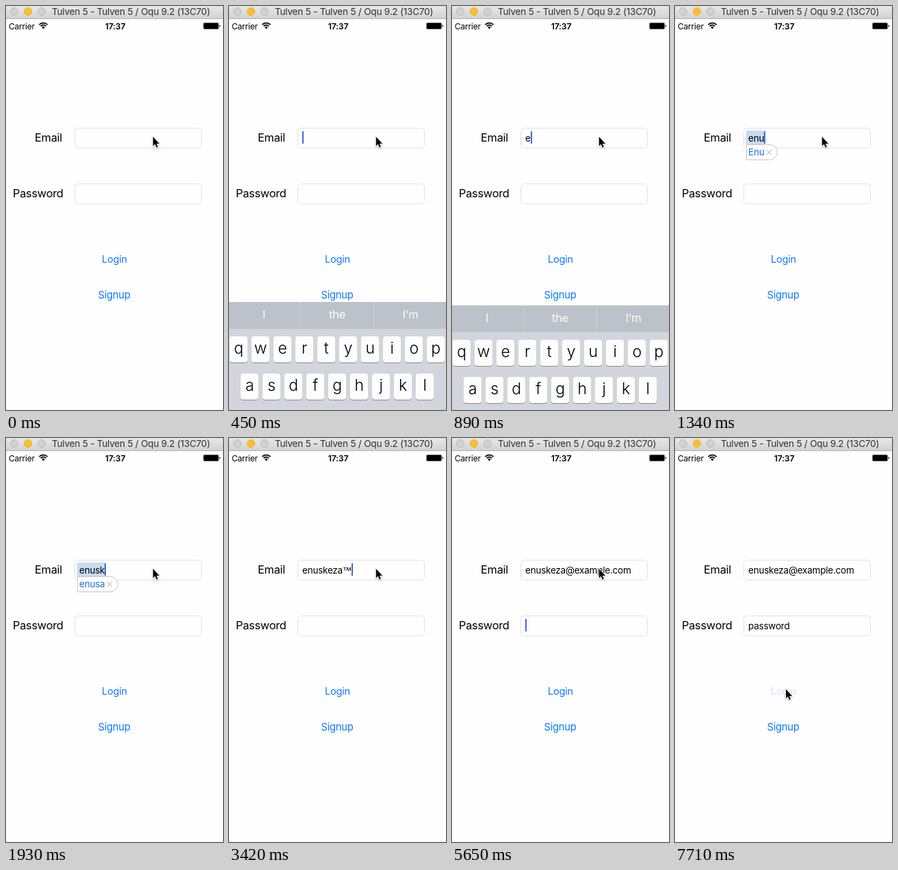
These frames come from a looping animation (317x587 px, 8000 ms). An HTML page with a canvas:

```html
<!DOCTYPE html>
<html lang="en">
<head>
<meta charset="utf-8">
<title>Login form</title>
<style>
  html, body { margin: 0; width: 100%; height: 100%; overflow: hidden; background: #fefefe; }
  canvas { display: block; width: 317px; height: 587px; }
</style>
</head>
<body>
<canvas id="stage"></canvas>
<script>
const W = 317, H = 587, LOOP = 8000;
const canvas = document.getElementById('stage');
const ctx = canvas.getContext('2d');
const dpr = window.devicePixelRatio || 1;
canvas.width = W * dpr;
canvas.height = H * dpr;

const BLUE = '#0a7aff', CARET = '#4169dc';
const USER = 'enuskeza', MAIL = USER + '@example.com', PASS = 'password';

// Each track is a list of [start time, value] with hard changes.
const keyboardTrack = [[0, 0], [300, 0.06], [450, 0.62], [590, 0.96], [740, 1], [890, 0.6], [1040, 0.1], [1190, 0]];
const emailTrack = [
  [0, ''], [890, USER.slice(0, 1)], [1190, USER.slice(0, 2)], [1340, USER.slice(0, 3)],
  [1630, USER.slice(0, 4)], [1930, USER.slice(0, 5)], [2080, USER.slice(0, 6)], [2380, USER],
  [3420, USER + '™'], [3570, USER], [3710, MAIL.slice(0, 9)], [3860, MAIL.slice(0, 10)],
  [4010, MAIL.slice(0, 11)], [4160, MAIL.slice(0, 12)], [4310, MAIL.slice(0, 14)],
  [4460, MAIL.slice(0, 15)], [4610, MAIL.slice(0, 16)], [4760, MAIL.slice(0, 17)],
  [4900, MAIL.slice(0, 18)], [5050, MAIL.slice(0, 19)], [5200, MAIL]
];
const hintTrack = [[0, ''], [1340, 'Enu'], [1630, 'enusa'], [2380, 'Nuskeza'], [2680, '']];
const passTrack = [[0, 0], [6090, 1], [6240, 3], [6390, 4], [6530, 6], [6680, 7], [6980, 8]];
const focusTrack = [[0, ''], [300, 'email'], [5650, 'pass'], [7420, '']];
const pointerTrack = [[0, 0], [7120, 0.2], [7270, 0.62], [7420, 0.93], [7560, 1]];

function at(track, t) {
  let value = track[0][1];
  for (const [start, v] of track) if (t >= start) value = v;
  return value;
}

function setFont(size, weight = 400, family = 'Inter') {
  ctx.font = `${weight} ${size}px ${family}, "Open Sans", sans-serif`;
  ctx.letterSpacing = size * -0.017 + 'px';
}

// Draws a string and returns the x where it ends (for left-aligned text).
function text(str, x, y, size, color = '#000', align = 'left', weight = 400, family = 'Inter') {
  setFont(size, weight, family);
  ctx.textAlign = align;
  ctx.fillStyle = color;
  ctx.fillText(str, x, y);
  return x + ctx.measureText(str).width;
}

function box(x, y, w, h, r, fill, stroke) {
  ctx.beginPath();
  ctx.roundRect(x, y, w, h, r);
  if (fill) { ctx.fillStyle = fill; ctx.fill(); }
  if (stroke) { ctx.strokeStyle = stroke; ctx.lineWidth = 1; ctx.stroke(); }
}

function line(points, color, width, closed) {
  ctx.beginPath();
  points.forEach(([x, y]) => ctx.lineTo(x, y));
  if (closed) ctx.closePath();
  ctx.strokeStyle = color;
  ctx.lineWidth = width;
  ctx.stroke();
}

function disc(x, y, r, fill, stroke) {
  ctx.beginPath();
  ctx.arc(x, y, r, 0, Math.PI * 2);
  if (fill) { ctx.fillStyle = fill; ctx.fill(); }
  ctx.strokeStyle = stroke;
  ctx.lineWidth = 1;
  ctx.stroke();
}

function titleBar() {
  const g = ctx.createLinearGradient(0, 0, 0, 18);
  g.addColorStop(0, '#e8e8e8');
  g.addColorStop(1, '#d2d2d2');
  ctx.fillStyle = g;
  ctx.fillRect(0, 0, W, 18);
  ctx.fillStyle = '#b4b4b4';
  ctx.fillRect(0, 18, W, 1);
  disc(12, 8, 5.5, '#d1d1d1', '#bcbcbc');
  disc(32, 8, 5.5, '#fdbe30', '#e9b02f');
  disc(52, 8, 5.5, '#d1d1d1', '#bcbcbc');
  text('Tulven 5 - Tulven 5 / Oqu 9.2 (13C70)', 67, 13, 13.6, '#303030');
}

function statusBar() {
  text('Carrier', 4, 33.5, 12);
  text('17:37', 159.5, 33.5, 12.3, '#000', 'center', 600);
  ctx.strokeStyle = '#000';
  ctx.lineWidth = 1.7;
  for (const r of [8.4, 5.3]) {
    ctx.beginPath();
    ctx.arc(54.5, 33, r, -Math.PI * 0.76, -Math.PI * 0.24);
    ctx.stroke();
  }
  ctx.beginPath();
  ctx.moveTo(54.5, 33.5);
  ctx.arc(54.5, 33, 3, -Math.PI * 0.76, -Math.PI * 0.24);
  ctx.fillStyle = '#000';
  ctx.fill();
  box(288.5, 24.5, 22, 9, 1.5, null, '#777');
  box(289, 25, 21, 8, 0.8, '#000');
  box(311.5, 27.5, 1.5, 3, 0.7, '#333');
}

function bubble(str) {
  setFont(13.5);
  const end = 107 + ctx.measureText(str).width;
  box(104.5, 201.5, end + 14.5 - 100, 22, [0, 11, 11, 0], '#fff', '#c6c6c6');
  text(str, 107, 217, 13.5, '#1b70d8');
  const x = end + 7, y = 212.5, s = 3.5;
  line([[x - s, y - s], [x + s, y + s]], '#a6a6a6', 1);
  line([[x + s, y - s], [x - s, y + s]], '#a6a6a6', 1);
}

function field(top, value, focused, marked) {
  box(100.5, top + 0.5, 185, 29, 5, '#fefefe', '#e1e1e1');
  if (marked) {
    setFont(13.5);
    ctx.fillStyle = '#c6dbf0';
    ctx.fillRect(104, top + 4, 3 + ctx.measureText(value).width, 20);
  }
  // The trade mark sign is full width, unlike Inter's.
  let end = 107;
  for (const part of value.split(/(?=™)/)) {
    end = text(part, end, top + 20, 13.5, '#000', 'left', 400, part === '™' ? '"Liberation Sans"' : 'Inter');
  }
  if (focused) {
    ctx.fillStyle = CARET;
    ctx.fillRect(Math.round(end), top + 5, 2, 18);
  }
}

function key(x, y, w, label, size, dark) {
  box(x, y + 1, w, 38, 4, '#888b91');
  box(x, y, w, 38, 4, dark ? '#abb1bd' : '#fdfdfd');
  if (label) text(label, x + w / 2, y + (size > 20 ? 25 : 24.5), size, '#000', 'center', size > 20 ? 300 : 400);
}

function keyRow(letters, x, y) {
  [...letters].forEach((c, i) => key(x + i * 32, y, 26, c, 23));
}

function globe(x, y) {
  disc(x, y, 9, null, '#111');
  ctx.beginPath();
  ctx.ellipse(x, y, 4.3, 9, 0, 0, Math.PI * 2);
  ctx.stroke();
  line([[x, y - 9], [x, y + 9]], '#111', 1);
  for (const [dy, r] of [[-4.5, 7.8], [0, 9], [4.5, 7.8]]) line([[x - r, y + dy], [x + r, y + dy]], '#111', 1);
}

function keyboard(shown) {
  if (!shown) return;
  ctx.save();
  ctx.translate(0, Math.round((1 - shown) * 253));
  ctx.fillStyle = '#d2d5db';
  ctx.fillRect(0, 334, W, 253);
  ctx.fillStyle = '#bbc2ca';
  ctx.fillRect(0, 334, W, 39);
  ctx.fillStyle = '#d0d5da';
  ctx.fillRect(104, 334, 1, 39);
  ctx.fillRect(211, 334, 1, 39);
  ['I', 'the', "I'm"].forEach((w, i) => text(w, 51 + i * 107, 358, 16.5, '#fff', 'center'));

  keyRow('qwertyuiop', 1, 384);
  keyRow('asdfghjkl', 17, 438);
  keyRow('zxcvbnm', 49, 492);
  key(1, 492, 36, '', 0, true);
  key(279, 492, 36, '', 0, true);
  key(1, 546, 34, '123', 15.5, true);
  key(41, 546, 34, '', 0, true);
  key(81, 546, 154, 'space', 15.5);
  key(241, 546, 74, 'return', 15.5, true);

  ctx.lineJoin = 'round';
  line([[19, 502], [28.5, 511.5], [23.5, 511.5], [23.5, 519], [14.5, 519], [14.5, 511.5], [9.5, 511.5]], '#111', 1.5, true);
  line([[286, 511], [293, 503.5], [307.5, 503.5], [307.5, 518.5], [293, 518.5]], '#111', 1.5, true);
  line([[295.5, 507.5], [302.5, 514.5]], '#111', 1.5);
  line([[302.5, 507.5], [295.5, 514.5]], '#111', 1.5);
  globe(58, 565);
  ctx.restore();
}

function pointer(x, y) {
  ctx.save();
  ctx.translate(x, y);
  ctx.scale(0.95, 0.95);
  ctx.lineJoin = 'round';
  ctx.shadowColor = 'rgba(0,0,0,.3)';
  ctx.shadowBlur = 2 * dpr;
  ctx.shadowOffsetY = dpr;
  line([[0.5, 0], [0.5, 14], [3.6, 11.2], [5.9, 16.2], [8, 15.3], [5.8, 10.4], [10.3, 10.4]], '#fff', 2, true);
  ctx.shadowColor = 'transparent';
  ctx.fillStyle = '#000';
  ctx.fill();
  ctx.restore();
}

function draw(t) {
  const hint = at(hintTrack, t);
  const focus = at(focusTrack, t);
  const move = at(pointerTrack, t);

  ctx.setTransform(dpr, 0, 0, dpr, 0, 0);
  ctx.fillStyle = '#fefefe';
  ctx.fillRect(0, 0, W, H);
  titleBar();
  statusBar();

  text('Email', 42, 197, 16.4);
  text('Password', 10, 278, 16.4);
  field(177, at(emailTrack, t), focus === 'email', hint);
  field(258, PASS.slice(0, at(passTrack, t)), focus === 'pass');
  if (hint) bubble(hint);

  text('Login', 158.5, 373, 14.6, t >= 7710 ? '#cde4ff' : BLUE, 'center');
  text('Signup', 158, 425, 14.8, BLUE, 'center');
  keyboard(at(keyboardTrack, t));
  pointer(214.3 - 52.8 * move, 190 + 175 * move);
}

function tick() {
  draw(performance.now() % LOOP);
  requestAnimationFrame(tick);
}
tick();
</script>
</body>
</html>
```
